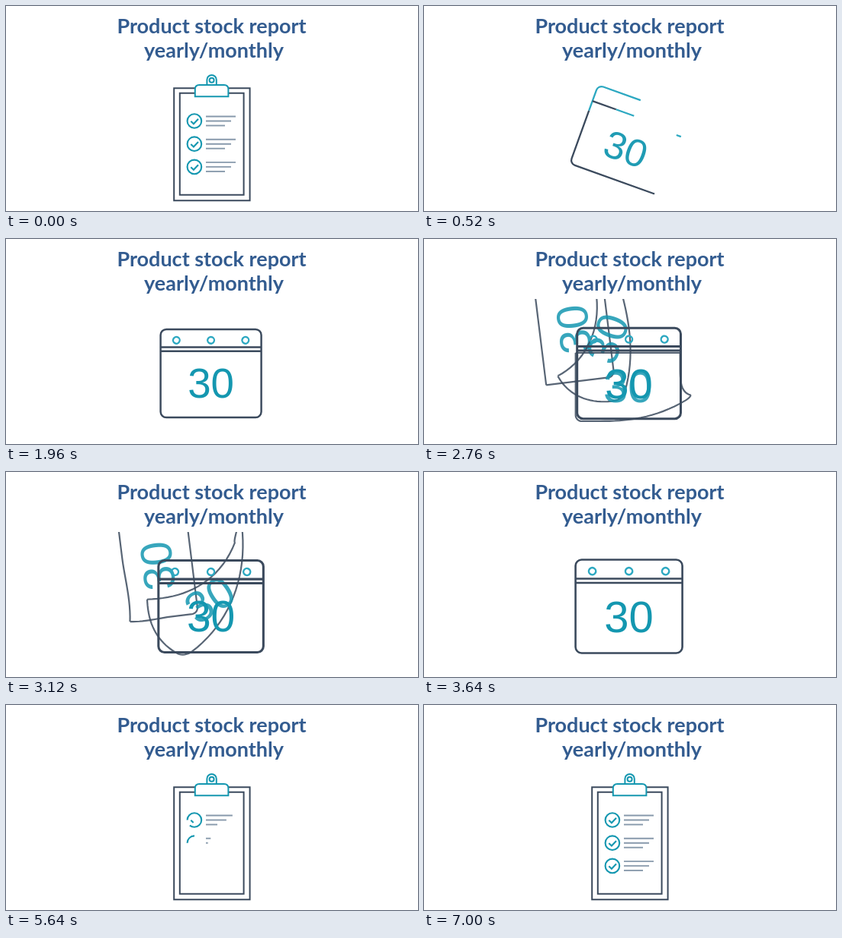
Recreate the animation shown at these times as an HTML page with a canvas. Size 540x270 px, loop 7040 ms.

```html
<!DOCTYPE html>
<html lang="en">
<head>
<meta charset="utf-8">
<title>Product stock report</title>
<style>
  html, body { margin: 0; width: 100%; height: 100%; overflow: hidden; background: #fff; }
  canvas { display: block; width: 540px; height: 270px; }
</style>
</head>
<body>
<canvas id="stage" width="540" height="270"></canvas>
<script>
const ctx = document.getElementById('stage').getContext('2d');
const LOOP = 7040;
const DARK = '#3b4a5d', TEAL = '#1497b0', LIGHT_TEAL = '#2ca8c1', GREY = '#8799ab', TITLE = '#335c90';
const DEG = Math.PI / 180;
const CAL_IN = 20, CAL_OUT = 3660, FLIP = 2250, FLIP_GAP = 220, FLIP_TIME = 610;

const clamp = x => Math.max(0, Math.min(1, x));
const lin = (t, start, dur) => clamp((t - start) / dur);
const out = (t, start, dur) => 1 - (1 - lin(t, start, dur)) ** 2;
const smooth = x => { x = clamp(x); return x * x * (3 - 2 * x); };

function stroke(path, color, width) {
  ctx.strokeStyle = color;
  ctx.lineWidth = width;
  ctx.stroke(path);
}

// Draws the first part p of a path, with a teal end while it grows.
function trim(path, len, p, width, color = DARK, tip = 0.2) {
  if (p <= 0) return;
  if (p >= 1) return stroke(path, color, width);
  const head = len * p;
  const tail = Math.min(head, len * tip * clamp((0.92 - p) / 0.05));
  ctx.setLineDash([head - tail, len * 2]);
  stroke(path, color, width);
  if (tail > 0) {
    ctx.setLineDash([tail, len * 2]);
    ctx.lineDashOffset = tail - head;
    stroke(path, LIGHT_TEAL, width);
  }
  ctx.setLineDash([]);
  ctx.lineDashOffset = 0;
}

// Rectangle that runs clockwise from its bottom right corner.
function box(x, y, w, h, r) {
  const path = new Path2D(), R = x + w, B = y + h;
  path.moveTo(R - r, B);
  path.arcTo(x, B, x, y, r);
  path.arcTo(x, y, R, y, r);
  path.arcTo(R, y, R, B, r);
  path.arcTo(R, B, x, B, r);
  path.closePath();
  return { path, len: 2 * (w + h) - (8 - 2 * Math.PI) * r };
}

function line(...pts) {
  const path = new Path2D();
  pts.forEach(([x, y], i) => i ? path.lineTo(x, y) : path.moveTo(x, y));
  return path;
}

function turnAround(x, y, angle, sx = 1, sy = sx) {
  ctx.translate(x, y);
  ctx.rotate(angle * DEG);
  ctx.scale(sx, sy);
}

function drawTitle() {
  ctx.fillStyle = TITLE;
  ctx.font = 'bold 27px Lato, sans-serif';
  ctx.textAlign = 'center';
  ctx.fillText('Product stock report', 269.5, 36);
  ctx.fillText('yearly/monthly', 272.5, 68);
}

function drawDay(x, y) {
  ctx.fillStyle = TEAL;
  ctx.font = '58px "Liberation Sans", Arial, sans-serif';
  ctx.textAlign = 'center';
  ctx.fillText('30', x, y);
}

const calFrame = box(-70, -61.5, 140, 123, 8);

function drawCalendar(t) {
  const angle = t < 1214 ? 8.5 * ((1214 - t) / 454) ** 2 : 0;
  const width = t > FLIP && t < 3620 ? 3.1 : 2.6;
  ctx.save();
  turnAround(268.6, 177, angle, 0.91 + 0.09 * (t - 1000) / 2640);
  trim(calFrame.path, calFrame.len, out(t, CAL_IN, 1326), width);
  trim(line([-70, -36.5], [70, -36.5]), 140, out(t, 350, 640), width);
  trim(line([70, -31], [-70, -31]), 140, out(t, 500, 816), width);

  const ring = out(t, 600, 850);
  if (ring > 0) for (const x of [-48, 0, 48]) {
    const start = -150 * DEG, end = start + ring * 2 * Math.PI;
    const arc = new Path2D();
    arc.arc(x, -46.3, 4.6, start, end);
    stroke(arc, LIGHT_TEAL, 2.5);
    if (ring < 1) {
      const dark = new Path2D();
      dark.arc(x, -46.3, 4.6, end - 60 * DEG * clamp((1 - ring) * 5), end);
      stroke(dark, DARK, 2.5);
    }
  }

  const day = out(t, 250, 350);
  if (day > 0) {
    ctx.save();
    ctx.globalAlpha = day;
    ctx.scale(0.6 + 0.4 * day, 0.6 + 0.4 * day);
    drawDay(0, 34);
    ctx.restore();
  }
  ctx.restore();
}

// A sheet peels off from its lower right corner, swings up and leaves at the top.
function drawSheet(p) {
  const W = 137, H = 90;
  const swing = smooth(p / 0.8), rise = Math.max(0, p - 0.83) / 0.17;
  const px = 201 - 40 * swing - 18 * rise, py = 147 + 52 * swing - 145 * rise;
  const turn = (u, v) => {
    const lead = (u / W + v / H) / 2;
    return -97 * DEG * smooth(p * 2 - 0.6 * (1 - lead));
  };
  const place = (u, v) => {
    const a = turn(u, v), c = Math.cos(a), s = Math.sin(a);
    return [px + u * c - v * s, py + u * s + v * c];
  };
  const edge = [], r = 8;
  const run = (u0, v0, u1, v1) => {
    for (let i = 0; i <= 20; i++) edge.push(place(u0 + (u1 - u0) * i / 20, v0 + (v1 - v0) * i / 20));
  };
  const corner = (cu, cv, from) => {
    for (let i = 1; i < 8; i++) {
      const a = (from + i * 90 / 8) * DEG;
      edge.push(place(cu + r * Math.cos(a), cv + r * Math.sin(a)));
    }
  };
  run(0, 0, W, 0);
  run(W, 0, W, H - r);
  corner(W - r, H - r, 0);
  run(W - r, H, r, H);
  corner(r, H - r, 90);
  run(0, H - r, 0, 0);
  ctx.globalAlpha = 0.85;
  stroke(line(...edge), DARK, 2.2);

  const [x, y] = place(W / 2, H / 2);
  ctx.save();
  turnAround(x, y, turn(W / 2, H / 2) / DEG);
  drawDay(0, 20);
  ctx.restore();
  ctx.globalAlpha = 1;
}

function drawSheets(t) {
  if (t >= 3620) return;
  for (let k = 0; k < 6; k++) {
    const p = (t - FLIP - k * FLIP_GAP) / FLIP_TIME;
    if (p > 0 && p < 1) drawSheet(p);
  }
}

const boardOuter = box(-49.8, -73.8, 99.4, 148, 0);
const boardInner = box(-42.2, -67.3, 83.8, 134, 0);

const clipBody = new Path2D('M-21.8 7.3V-2.5Q-21.8-8-16.3-8H16.3Q21.8-8 21.8-2.5V7.3Z');
const clipKnob = new Path2D('M-6.2-8V-14.8A6.2 6.2 0 0 1 6.2-14.8V-8');
const clipHole = new Path2D();
clipHole.arc(0, -14.3, 3, 0, 2 * Math.PI);

function drawClip(grow, angle) {
  if (grow <= 0) return;
  ctx.save();
  turnAround(269.6, 93 + 19 * grow, angle, 1, grow);
  ctx.fillStyle = '#fff';
  for (const part of [clipKnob, clipBody]) {
    ctx.fill(part);
    stroke(part, TEAL, 2);
  }
  stroke(clipHole, TEAL, 2);
  ctx.restore();
}

function drawRow(t, i) {
  const y = 151.5 + 30.2 * i, start = 5124 + 366 * i;
  const circle = lin(t, start, 600);
  if (circle > 0) {
    const arc = new Path2D();
    arc.arc(246.9, y, 9.3, Math.PI, Math.PI * (1 + 2 * circle));
    stroke(arc, TEAL, 2.1);
  }
  trim(line([242.3, y + 0.3], [245.9, y + 3.8], [252, y - 2.7]), 13.9, lin(t, start + 276, 720), 2.1, TEAL, 0);
  [[39, 70, 500], [33, 110, 500], [25, 150, 610]].forEach(([len, lag, dur], j) => {
    const grown = len * lin(t, start + lag, dur), ly = y - 6 + 6 * j;
    if (grown > 0) stroke(line([262, ly], [262 + grown, ly]), GREY, 1.9);
  });
}

function drawBoard(t) {
  const angle = t < 5104 ? 9.2 * ((5104 - t) / 824) ** 2 : 0;
  ctx.save();
  turnAround(270, 182, angle);
  trim(boardOuter.path, boardOuter.len, out(t, CAL_OUT, 560), 2);
  trim(boardInner.path, boardInner.len, out(t, 3700, 1450), 2);
  ctx.restore();
  drawClip(out(t, 4230, 850), angle);
  for (let i = 0; i < 3; i++) drawRow(t, i);
}

function render(t) {
  ctx.fillStyle = '#fff';
  ctx.fillRect(0, 0, 540, 270);
  drawTitle();
  ctx.save();
  ctx.beginPath();
  ctx.rect(0, 79, 540, 183);
  ctx.clip();
  if (t < CAL_IN) drawBoard(LOOP);
  else if (t < CAL_OUT) {
    drawSheets(t);
    drawCalendar(t);
  } else drawBoard(t);
  ctx.restore();
}

const began = performance.now();
function tick() {
  render((performance.now() - began) % LOOP);
  requestAnimationFrame(tick);
}
tick();
</script>
</body>
</html>
```
